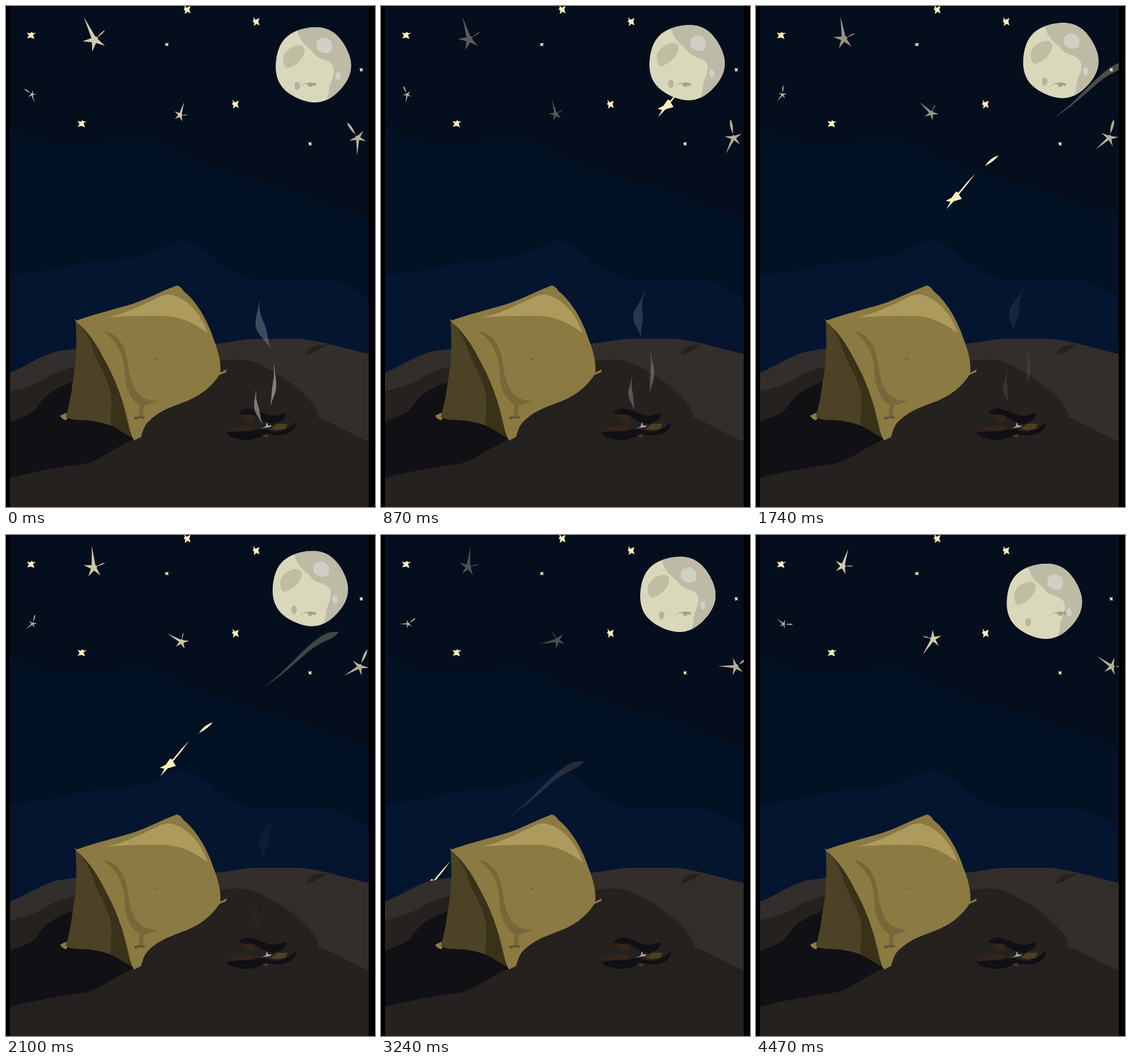
An HTML page with a canvas for the animation above (4500 ms loop, 642 px wide and 873 px high).

```html
<!DOCTYPE html>
<html>
<head>
<meta charset="utf-8">
<style>
html, body { margin: 0; width: 100%; height: 100%; overflow: hidden; background: #000; }
canvas { display: block; }
</style>
</head>
<body>
<canvas id="stage" width="642" height="873"></canvas>
<script>
const ctx = document.getElementById('stage').getContext('2d');
const LOOP = 4500, STEP = 30, TAU = Math.PI * 2, RAD = Math.PI / 180;
const CREAM = '#fbefb8', PALE = '#f0e5c2', DUST = '#f0dcaa', SMOKE = '#e2e6e2';

const mix = (a, b, k) => a + (b - a) * k;
const phase = (t, start, end) => Math.min(1, Math.max(0, (t - start) / (end - start)));
const easeOut = k => 1 - (1 - k) ** 2;

const layers = list => list.map(([color, d]) => [color, new Path2D(d)]);
const paint = list => list.forEach(([color, path]) => fill(path, color));

function fill(path, color, alpha = 1) {
  ctx.globalAlpha = alpha;
  ctx.fillStyle = color;
  ctx.fill(path);
  ctx.globalAlpha = 1;
}

function at(x, y, draw, angle = 0, size = 1) {
  ctx.save();
  ctx.translate(x, y);
  ctx.rotate(angle * RAD);
  ctx.scale(size, size);
  draw();
  ctx.restore();
}

// Closed path through the points spot(0) ... spot(1).
function trace(spot, count) {
  const path = new Path2D();
  for (let i = 0; i <= count; i++) path.lineTo(...spot(i / count));
  path.closePath();
  return path;
}

const sky = layers([
  ['#040e1d', 'M7 0H631V873H7Z'],
  ['#031125', 'M7 210C35 222 58 239 100 239C150 240 195 233 245 234C285 236 295 255 325 267C360 282 405 296 450 308C510 320 545 342 575 351Q605 359 631 367V873H7Z'],
  ['#051530', 'M7 468C60 467 105 452 155 444C195 441 215 442 245 433C270 425 285 410 308 410C338 411 352 437 380 455C405 470 425 478 460 478H560C590 478 603 495 631 509V873H7Z']
]);

const land = layers([
  ['#322e2c', 'M7 639C35 628 60 609 88 602L122 597L370 588C395 586 410 580 435 580H512C550 583 600 600 631 606V873H7Z'],
  ['#25211f', 'M522 608Q526 594 542 591L561 590L547 597L535 604Z'],
  ['#25211f', 'M7 671C40 664 60 656 78 643Q100 633 122 628L372 618C400 615 422 614 440 624C473 639 515 666 538 699Q545 712 543 717C575 729 600 746 631 759V873H7Z'],
  ['#111014', 'M7 725C30 715 45 712 54 699C70 675 85 667 118 654L150 700L222 750L221 756C190 769 165 790 140 797C95 803 45 812 7 822Z']
]);

const tent = layers([
  ['#8b7a42', 'M94 714L104 709L111 714L104 722L98 719Z'],
  ['#4c4326', 'M121 547C124 590 122 625 116 656Q112 690 104 716C120 725 135 719 155 724C178 727 196 736 217 751L205 690L160 590Z'],
  ['#393118', 'M124 550C147 561 157 592 176 617C190 645 204 680 208 715L218 752L182 730C182 705 187 680 178 660C170 635 157 620 150 594Q141 570 124 550Z'],
  ['#8b7a42', 'M119 545L123 548C150 538 190 528 220 519C245 511 270 497 297 487Q304 488 309 497C329 512 350 545 361 580C370 603 374 620 373 639L384 633L383 638L371 643C358 664 335 682 305 692C280 701 260 710 245 727Q239 735 235 751L223 757L219 751L215 738C209 705 196 663 178 629C165 604 150 573 122 550Z'],
  ['#ad9b5e', 'M175 543C210 536 247 516 271 505Q283 500 294 505C325 516 343 547 351 570C327 553 305 540 270 540Q225 539 175 543Z'],
  ['#786739', 'M169 567C188 569 198 580 206 598C213 615 212 645 223 664C230 681 245 688 264 688Q252 694 240 696L238 716H231L232 695C211 684 205 650 206 628C203 606 192 581 169 567Z'],
  ['#5f5130', 'M222 716L242 715L240 719L232 718L225 721Z'],
  ['#746438', 'M257 615L266 614L264 618L260 616Z']
]);

const fire = layers([
  ['#101014', 'M404 710Q409 702 421 701L440 706Q455 714 468 714L488 709L483 721L467 729L451 725L435 716L420 713Z'],
  ['#34241a', 'M409 713Q422 710 434 714L433 721L428 726L418 722Z'],
  ['#101014', 'M383 743Q405 741 425 741L444 736L462 741Q485 744 504 725Q507 734 493 744Q480 750 457 747Q437 753 426 756Q400 757 388 749Z'],
  ['#34241a', 'M385 739L397 733Q415 731 434 731L433 739L385 741Z'],
  ['#4d3f20', 'M460 737L471 728L490 728L486 737L472 739ZM445 748L457 746L454 752Z'],
  ['#a5a5a1', 'M438 738Q447 736 452 732L454 725L456 731L463 731L459 734L450 735Z']
]);

const moon = trace(k => {
  const r = 65.5 + Math.sin(k * TAU * 5 + 1);
  return [534 + r * Math.cos(k * TAU), 102 + r * Math.sin(k * TAU)];
}, 60);
const moonMarks = layers([
  ['#bdbba6', 'M507 43C512 64 524 70 533 79C545 98 565 90 570 107C573 122 561 136 562 147Q561 160 553 172H610V30H515Z'],
  ['#bfbea2', 'M483 86Q490 73 505 69Q519 66 520 77Q519 88 509 98Q500 106 488 109Q480 100 483 86Z'],
  ['#d1d0c5', 'M541 62Q548 53 558 56Q569 61 567 74Q566 83 554 82Q540 79 540 70Z'],
  ['#d1d0c5', 'M575 115Q583 112 582 124Q580 131 576 128Q571 121 575 115Z'],
  ['#b5b4a2', 'M502 135Q506 129 511 135Q513 143 507 147Q501 146 502 135Z']
]);
const smudge = new Path2D('M504 144L519 135L530 133L540 135L538 140L534 138L531 141L526 140L524 136L519 136Z');

const spark = new Path2D('M-5 -8L-1 -3L6 -6L4 0L6 7L1 4L-4 8L-3 2L-6 0L-4 -3Z');
const sparks = [
  [315, 6], [435, 27], [399, 171], [529, 240, 0.5], [618, 111, 0.5],
  [44, 51, 1, 95], [132, 205, 1, 95], [280, 67, 0.5, 95]
];

const comet = new Path2D('M-13 19L-6 6L-14 4L-4 -1L4 -12L8 -10Q22 -28 37 -43Q24 -24 9 -7L14 1L0 5ZM54 -56Q63 -71 78 -75Q72 -66 54 -56Z');
const trail = new Path2D('M0 0L32 -27L68 -63Q98 -92 113 -97Q125 -100 133 -99Q127 -90 112 -84Q90 -75 68 -54L33 -24Z');

// Five even arms: one long, one detached fin, three short.
function starPath(long, short, finArm, fin, finWidth) {
  const path = new Path2D();
  const spot = (turn, r) => [Math.sin(turn * TAU) * r, -Math.cos(turn * TAU) * r];
  const base = long * 0.14;
  for (let i = 0; i < 5; i++) {
    path.lineTo(...spot(i / 5, i === 0 ? long : i === finArm ? base * 1.2 : short));
    path.lineTo(...spot((i + 0.5) / 5, base));
  }
  path.closePath();
  const turn = finArm / 5, bend = finWidth / fin / TAU;
  path.moveTo(...spot(turn, fin * 0.2));
  path.quadraticCurveTo(...spot(turn - bend, fin * 0.75), ...spot(turn, fin));
  path.quadraticCurveTo(...spot(turn + bend, fin * 0.75), ...spot(turn, fin * 0.2));
  return path;
}
const slimStar = starPath(44, 21, 1, 25, 3);
const finStar = starPath(31, 16, 2, 33, 6);
const twinkle = t => 0.58 + 0.3 * Math.cos(2 * TAU * t / LOOP);
const steady = () => 0.75;
const bigStars = [
  { path: slimStar, from: [154, 59], to: [151, 54], turn: [-25, 18], size: [1, 0.72], glow: twinkle },
  { path: slimStar, from: [303, 190], to: [308, 181], turn: [17, -148], size: [0.55, 0.75], glow: twinkle },
  { path: finStar, from: [45, 154], to: [48, 155], turn: [162, 310], size: [0.5, 0.5], glow: steady },
  { path: finStar, from: [612, 230], to: [619, 229], turn: [182, 306], size: [1, 1], glow: steady }
];

// Each wisp drifts from one pair of tips to another while it fades.
const wisps = [
  { top: [441, 514, 469, 488], foot: [461, 597, 449, 567], bend: -9, width: 16, glow: 0.25, end: 2450 },
  { top: [466, 626, 470, 594], foot: [460, 696, 471, 662], bend: 4, width: 6, glow: 0.48, end: 2050 },
  { top: [435, 670, 438, 634], foot: [446, 728, 439, 692], bend: -5, width: 7, glow: 0.45, end: 2200 }
];

function drawStars(t) {
  for (const [x, y, size = 1, angle = 0] of sparks) at(x, y, () => fill(spark, CREAM), angle, size);
  const k = t / LOOP;
  for (const { path, from, to, turn, size, glow } of bigStars) {
    at(mix(from[0], to[0], k), mix(from[1], to[1], k),
      () => fill(path, PALE, glow(t)), mix(...turn, k), mix(...size, k));
  }
}

function drawComet(t) {
  const drift = 0.198 * t;
  at(862 - drift, -148 + drift, () => fill(trail, DUST, 0.5 * (1 - phase(t, 0, 4400))));
  at(646 - 0.1735 * t, 15 + 0.184 * t, () => fill(comet, CREAM));
}

function drawMoon(t) {
  const rise = phase(t, 0, 2180), sink = phase(t, 2180, LOOP);
  at(-5.6 * rise - 27.8 * sink, -9.5 * rise + 22.8 * sink, () => {
    fill(moon, '#d9d8ba');
    ctx.clip(moon);
    paint(moonMarks);
  });
  fill(smudge, '#a5957c', 0.85);
}

function drawWisps(t) {
  const k = easeOut(phase(t, 0, 2000));
  for (const { top, foot, bend, width, glow, end } of wisps) {
    const [x0, y0, x1, y1] = [top, foot].flatMap(p => [mix(p[0], p[2], k), mix(p[1], p[3], k)]);
    const outline = trace(u => {
      const s = 1 - Math.abs(1 - 2 * u), side = u < 0.5 ? -0.5 : 0.5;
      const swell = 1 + width * Math.sin(Math.PI * s ** 1.25) ** 2;
      return [mix(x0, x1, s) + bend * Math.sin(Math.PI * s) + side * swell, mix(y0, y1, s)];
    }, 48);
    fill(outline, SMOKE, glow * (1 - phase(t, 0, end)));
  }
}

function frame(now) {
  const t = Math.floor((now % LOOP) / STEP) * STEP;
  ctx.fillStyle = '#000';
  ctx.fillRect(0, 0, 642, 873);
  ctx.save();
  ctx.beginPath();
  ctx.rect(7, 0, 624, 873);
  ctx.clip();
  paint(sky);
  drawStars(t);
  drawComet(t);
  drawMoon(t);
  paint(land);
  paint(tent);
  paint(fire);
  drawWisps(t);
  ctx.restore();
  requestAnimationFrame(frame);
}
frame(0);
</script>
</body>
</html>
```
